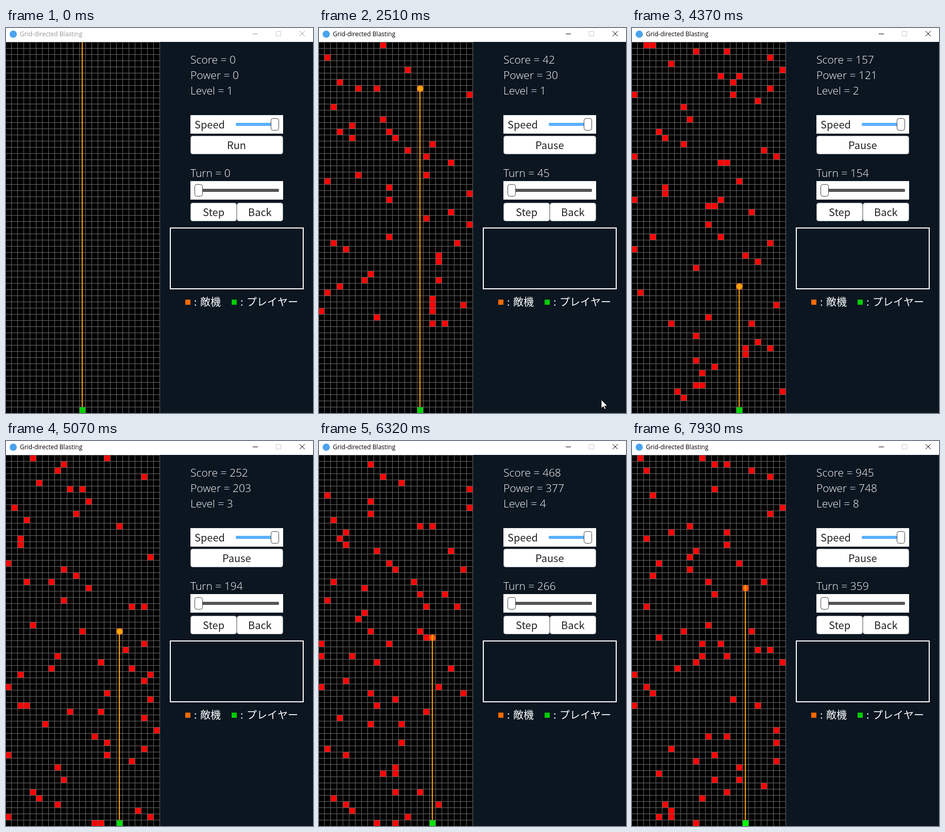
Recreate the animation shown at these times as an HTML page with a canvas. Size 596 by 747 pixels, loop 7990 ms.

```html
<!DOCTYPE html>
<html lang="ja">
<head>
<meta charset="utf-8">
<style>
  html, body { margin: 0; width: 596px; height: 747px; overflow: hidden; background: #0b1621; }
  canvas { display: block; }
</style>
</head>
<body>
<canvas id="stage" width="596" height="747"></canvas>
<script>
const ctx = document.getElementById('stage').getContext('2d');
const LOOP = 7990, RUN_AT = 1670, STEP = 69.2, LAST_STEP = 90;
const CELL = 12, COLS = 25, ROWS = 60, TOP = 27, LOCK_TURNS = 15.3;
const UI_FONT = '20px "Noto Sans CJK JP", "Noto Sans CJK", sans-serif';
const STAT_FONT = '300 21px "Open Sans", "Noto Sans", sans-serif';

// Key points: turn, score, power
const scoreKeys = [[0, 0, 0], [45, 42, 30], [106, 95, 75], [154, 157, 121],
  [230, 338, 276], [307, 615, 491], [359, 945, 748]];
// Key points: target index, its column, the turn it enters
const targetKeys = [[0, 12, 0], [3, 16, 38], [7, 16, 84], [10, 17, 115],
  [15, 18, 200], [20, 18, 292], [23, 18, 338]];
// Key points: time, x, y
const cursorKeys = [[190, 549, 693], [610, 514, 403], [860, 514, 403], [1340, 466, 228],
  [1880, 466, 228], [2440, 548, 721], [3270, 548, 721], [3540, 554, 738], [3620, 556, 760]];

// Linear interpolation between key points, rounded and clamped at both ends.
function interpolate(keys, at) {
  const found = keys.findIndex(key => key[0] >= at);
  const next = found < 0 ? keys.length - 1 : Math.max(1, found);
  const [p, q] = [keys[next - 1], keys[next]];
  const u = Math.min(1, Math.max(0, (at - p[0]) / (q[0] - p[0])));
  return [1, 2].map(i => Math.round(p[i] + (q[i] - p[i]) * u));
}

// The beam stays on one enemy for LOCK_TURNS, then takes the next.
const lockIndex = turn => Math.round(turn / LOCK_TURNS);
const targetAt = index => interpolate(targetKeys, index);
const beamColumn = turn => targetAt(lockIndex(turn))[0];

const random = n => { const v = Math.sin(n * 127.1) * 43758.5453; return v - Math.floor(v); };

// Columns in which enemies enter on a turn, leaving the beam's coming path free.
function wave(turn) {
  const [left, right] = [beamColumn(turn), beamColumn(turn + ROWS)];
  return [0, 1]
    .filter(i => random(turn * 4 + i) < 0.53)
    .map(i => Math.floor(random(turn * 4 + i + 2) * COLS))
    .filter(col => col < left || col > right);
}

function rect(color, x, y, w, h) {
  ctx.fillStyle = color;
  ctx.fillRect(x, y, w, h);
}

function text(value, x, y, color = '#fff', font = UI_FONT) {
  ctx.font = font;
  ctx.fillStyle = color;
  ctx.fillText(value, x, y);
}

function roundBox(x, y, w, h, radius, fill, stroke) {
  ctx.beginPath();
  ctx.roundRect(x, y, w, h, radius);
  ctx.fillStyle = fill;
  ctx.fill();
  if (!stroke) return;
  ctx.strokeStyle = stroke;
  ctx.lineWidth = 1;
  ctx.stroke();
}

function circle(color, x, y, radius) {
  ctx.beginPath();
  ctx.arc(x, y, radius, 0, Math.PI * 2);
  ctx.fillStyle = color;
  ctx.fill();
}

function drawTitleBar(focused) {
  const ink = focused ? '#000' : '#999';
  rect('#fff', 0, 0, 596, TOP);
  circle('#4aa3ee', 14, 12, 7);
  text('Grid-directed Blasting', 27, 16, ink, '12px "Open Sans", sans-serif');
  rect(ink, 479, 11, 10, 1);
  ctx.lineWidth = 1;
  ctx.strokeStyle = '#ccc';
  ctx.strokeRect(524.5, 6.5, 9, 9);
  ctx.strokeStyle = ink;
  ctx.stroke(new Path2D('M570 6l10 10m0-10l-10 10'));
}

function drawCell(color, col, row) {
  if (row >= 0 && row < ROWS) rect(color, col * CELL - 1, TOP + 1 + row * CELL, 11, 11);
}

function drawBoard(turn, level) {
  rect('#000', 0, TOP, 299, 720);
  for (let i = 0; i < COLS; i++) rect('#686868', i * CELL + 10, TOP, 1, 720);
  for (let i = 0; i < ROWS; i++) rect('#686868', 0, TOP + i * CELL, 299, 1);

  const lock = lockIndex(turn);
  const [column, entered] = targetAt(lock);
  const x = column * CELL + 4;
  let beamTop = TOP;

  if (turn > 0) {
    for (let born = Math.max(0, turn - ROWS + 1); born <= turn; born++) {
      wave(born).forEach(col => drawCell('#f00', col, turn - born));
    }
    for (let i = lock; i < lock + 5; i++) {
      const [col, born] = targetAt(i);
      drawCell('#f00', col, turn - born);
    }
    const y = TOP + 6.5 + (turn - entered) * CELL;
    const amber = turn % 10 < 6;
    circle(amber ? '#ffa000' : '#ff5a00', x + 0.5, y, 6);
    beamTop = amber ? y : y - 6;
  }
  rect('#ffa500', x - 1, beamTop, 2, 735 - beamTop);
  drawCell(`rgb(0,${Math.min(255, 198 + level * 7)},0)`, column, ROWS - 1);
}

function drawButton(label, x, y, w, cursor) {
  const hover = cursor && cursor[0] >= x && cursor[0] < x + w && cursor[1] >= y && cursor[1] < y + 36;
  roundBox(x + 0.5, y + 0.5, w - 1, 35, 4, hover ? '#e6f3ff' : '#fff', '#a0a4a8');
  ctx.font = UI_FONT;
  text(label, Math.round(x + (w - ctx.measureText(label).width) / 2), y + 26, '#222');
  return hover;
}

function drawSlider(y, color, from, to, thumb) {
  rect('#fff', 358, y, 180, 36);
  roundBox(from, y + 15, to - from, 6, 2, color);
  roundBox(thumb - 7.5, y + 6.5, 15, 23, 4, '#fff', '#444');
}

function drawPanel(turn, score, power, level, running, cursor) {
  rect('#0b1621', 299, TOP, 297, 720);
  [['Score', score, 69], ['Power', power, 99], ['Level', level, 129], ['Turn', turn, 289]]
    .forEach(([name, value, y]) => text(`${name} = ${value}`, 358, y, '#fff', STAT_FONT));

  drawSlider(169, '#5ab0ff', 446, 522, 522);
  text('Speed', 366, 195, '#222');
  drawSlider(297, '#555', 374, 530, 374);
  const hovers = [
    drawButton(running ? 'Pause' : 'Run', 358, 209, 180, cursor),
    drawButton('Step', 358, 339, 90, cursor),
    drawButton('Back', 448, 339, 90, cursor)
  ];

  ctx.strokeStyle = '#fff';
  ctx.lineWidth = 2;
  ctx.strokeRect(319, 388, 258, 118);
  [['#ff6a00', '敵機', 348], ['#0c0', 'プレイヤー', 438]].forEach(([color, label, x]) => {
    rect(color, x, 527, 10, 10);
    text(':', x + 17, 539);
    text(label, x + 29, 539);
  });
  return hovers.some(Boolean);
}

const arrow = new Path2D('M0 0V17L4 13.5 6.5 19 9 18 6.5 12.5H12Z');
const hand = new Path2D('M-2 0h3v7l8 2v6l-2 5h-8l-6-8 2-1 3 3z');

function drawCursor([x, y], shape) {
  ctx.save();
  ctx.translate(x, y);
  ctx.lineWidth = 1;
  ctx.strokeStyle = '#000';
  ctx.fillStyle = '#fff';
  ctx.fill(shape);
  ctx.stroke(shape);
  ctx.restore();
}

function draw(time) {
  const step = Math.min(LAST_STEP, Math.floor((time - RUN_AT) / STEP));
  const running = step >= 0;
  const turn = Math.max(0, Math.round(4.02 * step - 3));
  const [score, power] = interpolate(scoreKeys, turn);
  const level = 1 + Math.floor(power / 100);
  const cursor = time < 190 ? null
    : interpolate(cursorKeys, 190 + Math.floor((time - 190) / 70) * 70);

  drawTitleBar(running);
  drawBoard(turn, level);
  const hovering = drawPanel(turn, score, power, level, running, cursor);
  if (cursor) drawCursor(cursor, hovering ? hand : arrow);
}

const start = performance.now();
function tick() {
  draw((performance.now() - start) % LOOP);
  requestAnimationFrame(tick);
}
tick();
</script>
</body>
</html>
```
